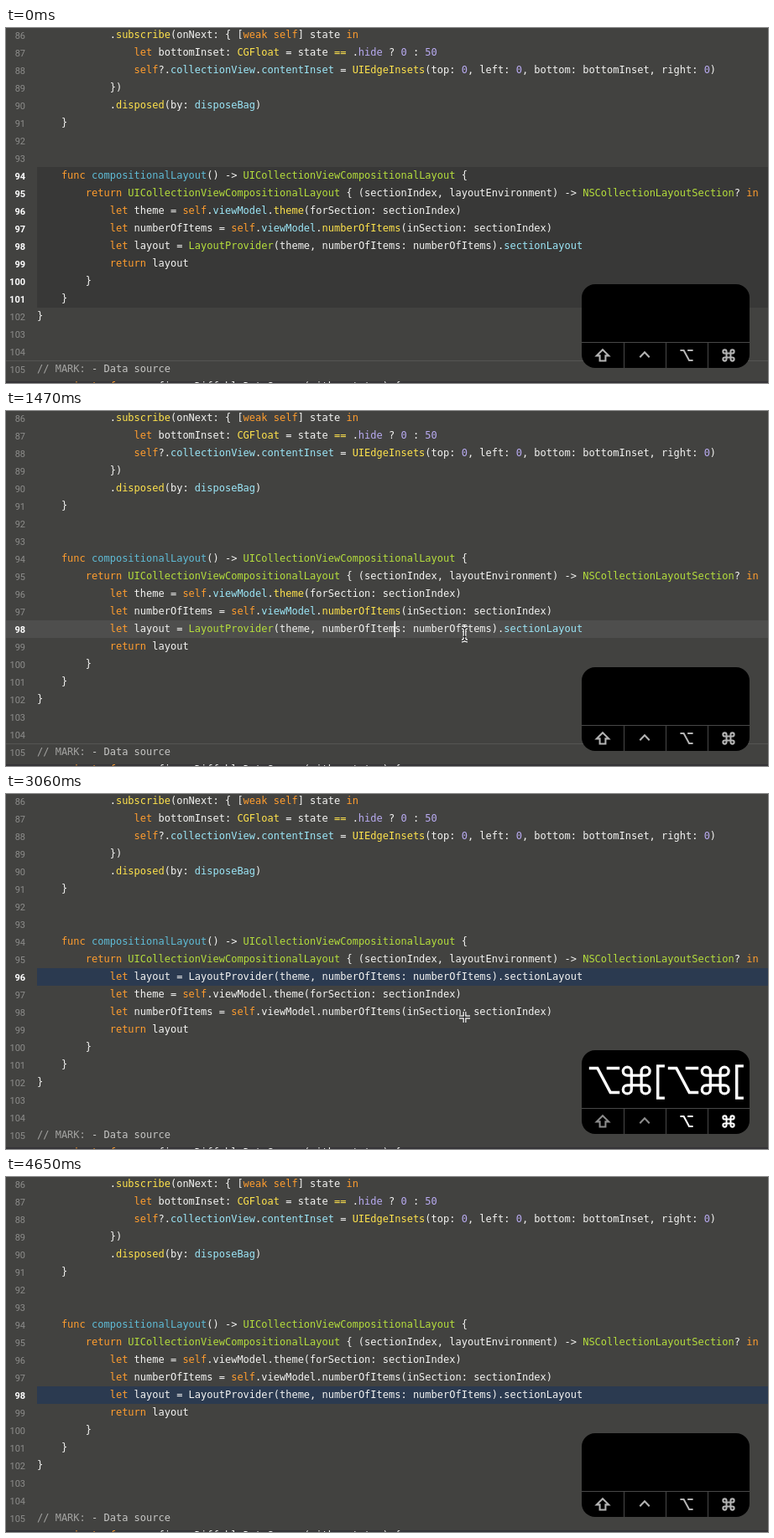
Animation, 908 px wide and 424 px high, one loop 4680 ms. Source, as an HTML page with a canvas:

```html
<!DOCTYPE html>
<html lang="en">
<head>
<meta charset="utf-8">
<title>Moving a line of code</title>
<style>
  html, body { margin: 0; width: 100%; height: 100%; overflow: hidden; background: #424240; }
  canvas { display: block; }
</style>
</head>
<body>
<canvas id="stage" width="908" height="424"></canvas>
<script>
const ctx = document.getElementById('stage').getContext('2d');
const LOOP = 4680, LEFT = 37, PITCH = 7.224, ROW = 21, FIRST = 86;

const CODE = `            .subscribe(onNext: { [weak self] state in
                let bottomInset: CGFloat = state == .hide ? 0 : 50
                self?.collectionView.contentInset = UIEdgeInsets(top: 0, left: 0, bottom: bottomInset, right: 0)
            })
            .disposed(by: disposeBag)
    }


    func compositionalLayout() -> UICollectionViewCompositionalLayout {
        return UICollectionViewCompositionalLayout { (sectionIndex, layoutEnvironment) -> NSCollectionLayoutSection? in
            let theme = self.viewModel.theme(forSection: sectionIndex)
            let numberOfItems = self.viewModel.numberOfItems(inSection: sectionIndex)
            let layout = LayoutProvider(theme, numberOfItems: numberOfItems).sectionLayout
            return layout
        }
    }
}


// MARK: - Data source
    private func configureDiffableDataSource(with: states) {`.split('\n');

const WHITE = '#f4f4f2', YELLOW = '#ffe34c';
const colors = {};
const paint = (color, words) => words.split(' ').forEach(w => colors[w] = color);
paint('#ff9d2e', 'let func return self in weak private');
const keywords = { ...colors };
paint(YELLOW, 'CGFloat ==');
paint('#9be6f7', 'viewModel collectionView contentInset disposeBag sectionLayout');
paint('#b5de3c', 'UICollectionViewCompositionalLayout LayoutProvider NSCollectionLayoutSection');
paint('#5fbcd6', 'compositionalLayout');
paint('#b9abf2', 'hide 0 50');

// Editing times in ms
const T = { show: 400, press: 520, release: 740, arrive: 1250, hold: 2050,
  up1: 2350, move1: 2520, up2: 2760, down1: 3380, down2: 3700, end: 4380 };

const rowY = n => 8 + (n - FIRST) * ROW;
const colX = c => LEFT + c * PITCH;

function rect(x, y, w, h, color, r = 0) {
  ctx.fillStyle = color;
  ctx.beginPath();
  ctx.roundRect(x, y, w, h, r);
  ctx.fill();
}

function codeLine(text, y, plain) {
  ctx.font = '12px "DejaVu Sans Mono", monospace';
  ctx.textAlign = 'left';
  if (text.startsWith('//')) {
    ctx.fillStyle = '#a3a3a1';
    ctx.fillText('// MARK:', LEFT, y + 4);
    ctx.fillStyle = '#c6c6c4';
    ctx.fillText('- Data source', colX(9), y + 4);
    return;
  }
  for (const m of text.matchAll(/\w+|==|=|[^\w=]+/g)) {
    const word = m[0], call = /\w/.test(word) && text[m.index + word.length] === '(';
    ctx.fillStyle = (plain ? keywords : colors)[word] || (call && !plain ? YELLOW : WHITE);
    ctx.fillText(word, colX(m.index), y + 4);
  }
}

function lineNumber(n, active) {
  ctx.font = `${active ? 'bold ' : ''}11px Roboto, sans-serif`;
  ctx.textAlign = 'right';
  ctx.fillStyle = active ? '#fff' : '#8d8d8b';
  ctx.fillText(n, 23, rowY(n) + 5);
}

const corner = (a, b, sweep) =>
  `M${6.5 * a},${6.5 * b}H${12 * a}A5.5,5.5 0 1 ${sweep} ${6.5 * a},${12 * b}Z`;
const ICON = {
  shift: new Path2D('M0-18L19,1H9V17H-9V1H-19Z'),
  control: new Path2D('M-15,6L0-10L15,6'),
  option: new Path2D('M-20-16H-9L8,16H20M3-16H20'),
  command: new Path2D('M-6.5-6.5H6.5V6.5H-6.5Z' +
    corner(-1, -1, 1) + corner(1, -1, 0) + corner(1, 1, 1) + corner(-1, 1, 0)),
  '[': new Path2D('M5-21H-4V21H5'),
  ']': new Path2D('M-5-21H4V21H-5'),
  arrow: new Path2D('M0,0V16L4,12.5L6.5,18.5L9.3,17.3L6.8,11.5H12Z'),
  beam: new Path2D('M-3.5-8Q0-8 0-5V5Q0,8-3.5,8M3.5-8Q0-8 0-5M0,5Q0,8 3.5,8M-2,3H2'),
  cross: new Path2D('M-6.5,0H6.5M0-6.5V6.5')
};

function stroke(path, x, y, scale, width, color) {
  ctx.save();
  ctx.translate(x, y);
  ctx.scale(scale, scale);
  ctx.lineWidth = width;
  ctx.strokeStyle = color;
  ctx.stroke(path);
  ctx.restore();
}

function chord(x, bracket, s) {
  stroke(ICON.option, x, 342, s, 3.8, '#fff');
  stroke(ICON.command, x + 42 * s, 342, s, 3.6, '#fff');
  stroke(ICON[bracket], x + (bracket === '[' ? 74 : 69) * s, 344, s, 3.8, '#fff');
}

function keyPanel(t) {
  rect(686, 306, 200, 100, '#000', 16);
  rect(686, 375, 200, 1, '#484848');
  const held = t >= T.hold && t < T.end;
  ['shift', 'control', 'option', 'command'].forEach((name, i) => {
    if (i) rect(686 + i * 50, 376, 1, 30, '#484848');
    const color = !held ? '#b4b4b4' : i > 1 ? '#fff' : '#8c8c8c';
    stroke(ICON[name], 711 + i * 50, 391, .38, 5.4, color);
  });
  if (t < T.up1 || t >= T.end) return;
  const bracket = t < T.down1 ? '[' : ']';
  if (t >= (bracket === '[' ? T.up2 : T.down2)) {
    chord(713, bracket, .91);
    chord(807, bracket, .91);
  } else chord(758, bracket, 1);
}

function pointer(t) {
  if (t < T.show || t >= T.end) return;
  if (t < T.release + 60) {
    if (t >= T.press && t < T.release) {
      const ring = new Path2D();
      ring.arc(0, 0, 19.5, 0, 2 * Math.PI);
      stroke(ring, 460, 267, 1, 5.5, '#000');
      stroke(ring, 460, 267, 1, 2.3, '#fff');
    }
    stroke(ICON.arrow, 460, 265, 1, 2.4, '#fff');
    ctx.save();
    ctx.translate(460, 265);
    ctx.fillStyle = '#111';
    ctx.fill(ICON.arrow);
    ctx.restore();
    return;
  }
  const p = Math.min(1, (t - T.release - 60) / (T.arrive - T.release - 60));
  const x = 460 + 86.5 * p * p * (3 - 2 * p);
  const shape = t < T.hold ? ICON.beam : ICON.cross;
  stroke(shape, x, 266.5, 1, 3.8, '#fff');
  stroke(shape, x, 266.5, 1, 1.4, '#222');
}

function draw(t) {
  rect(0, 0, 908, 424, '#424240');
  rect(0, 422, 908, 2, '#353438');

  const moved = t >= T.move1, inBlock = t < T.release;
  const current = !moved || t >= T.down2 ? 98 : t >= T.up2 && t < T.down1 ? 96 : 97;
  const top = rowY(current) - 10;
  if (inBlock) rect(LEFT, 166, 871, 168, '#383837');
  else if (moved) rect(LEFT, top, 871, ROW, '#2b3a50');
  else rect(0, top, 908, ROW, '#4e4e4d');
  if (!moved) rect(0, 397, 908, 1, '#555553');
  if (t >= T.hold && !moved) rect(483, 250, 97, 21, '#3b70c0', 4);

  const order = CODE.map((_, i) => i);
  order.splice(current - FIRST, 0, order.splice(98 - FIRST, 1)[0]);
  order.forEach((source, i) => {
    const n = FIRST + i, id = FIRST + source;
    const plain = id === 106 || moved && (id === 97 || id === 98) || t >= T.up2 && id === 96;
    codeLine(CODE[source], rowY(n), plain);
    if (n < 106) lineNumber(n, inBlock ? n >= 94 && n <= 101 : n === current);
  });

  if (!inBlock && !moved) rect(462.5, 251, 1.5, 19, '#fff');
  keyPanel(t);
  pointer(t);
}

function tick() {
  draw(performance.now() % LOOP);
  requestAnimationFrame(tick);
}
tick();
</script>
</body>
</html>
```
